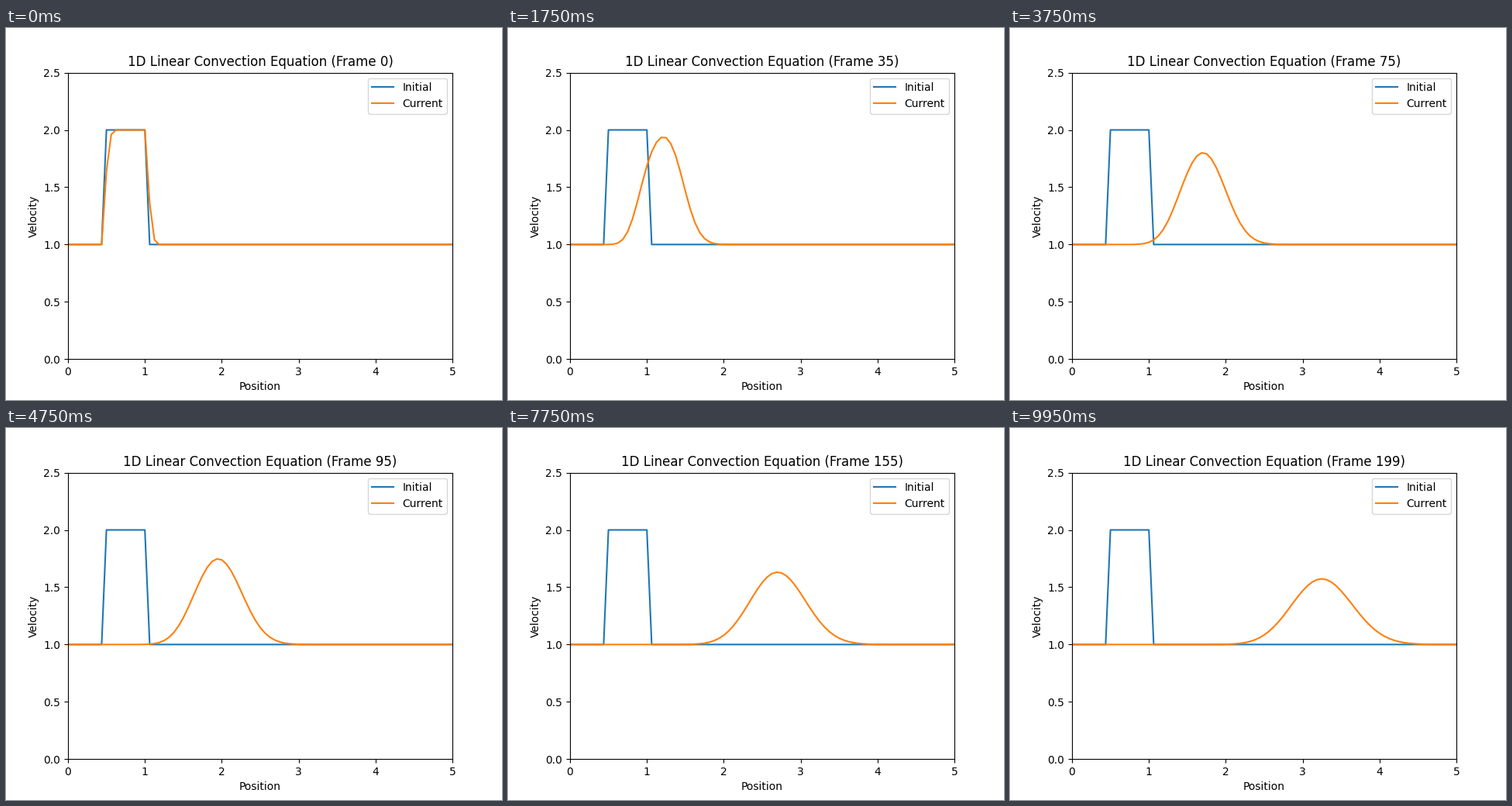
Animation, 640 px wide and 480 px high, one loop 10 s. Source, as a matplotlib script:

```python
import numpy as np
import matplotlib.pyplot as plt
from matplotlib.animation import FuncAnimation

LENGTH = 5.0
POINTS = 81
COURANT = 0.2       # c * dt / dx
FRAMES = 200
INTERVAL = 50       # ms
WARMUP = 2          # steps already taken when the first frame is shown


def upwind_step(u):
    """Advance the wave by one time step with a backward difference in space."""
    new = u.copy()
    new[1:] -= COURANT * (u[1:] - u[:-1])
    return new


x = np.linspace(0, LENGTH, POINTS)
initial = np.where((x >= 0.5) & (x <= 1.0), 2.0, 1.0)

history = [initial]
for _ in range(FRAMES + WARMUP):
    history.append(upwind_step(history[-1]))

plt.rcParams["font.family"] = "DejaVu Sans"
fig, ax = plt.subplots(figsize=(6.4, 4.8), dpi=100)
ax.plot(x, initial, color="tab:blue", label="Initial")
current, = ax.plot(x, history[WARMUP], color="tab:orange", label="Current")
ax.set_xlim(0, LENGTH)
ax.set_ylim(0, 2.5)
ax.set_xlabel("Position")
ax.set_ylabel("Velocity")
ax.legend(loc="upper right")


def update(frame):
    current.set_ydata(history[frame + WARMUP])
    title = ax.set_title(f"1D Linear Convection Equation (Frame {frame})")
    return current, title


anim = FuncAnimation(fig, update, frames=FRAMES, interval=INTERVAL,
                     repeat=True, repeat_delay=0, blit=False)
plt.show()
```
